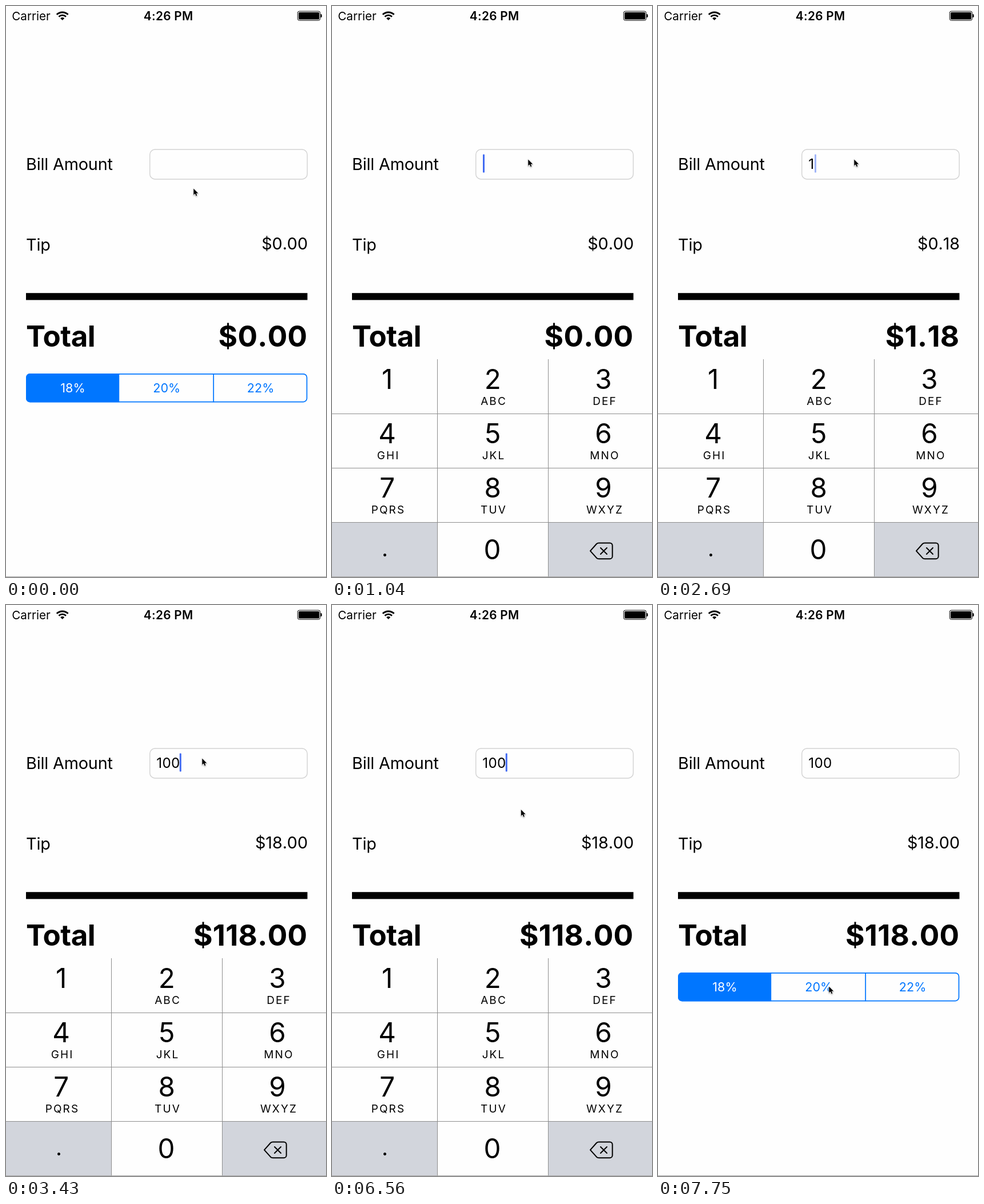
Recreate the animation shown at these times as an HTML page with a canvas. Size 560x999 px, loop 8000 ms.

```html
<!DOCTYPE html>
<html lang="en">
<head>
<meta charset="utf-8">
<title>Tip calculator</title>
<style>
html, body { margin: 0; width: 100%; height: 100%; overflow: hidden; background: #fefefe; }
canvas { display: block; width: 560px; height: 999px; }
</style>
</head>
<body>
<canvas id="stage" width="560" height="999"></canvas>
<script>
const ctx = document.getElementById('stage').getContext('2d');
const LOOP = 8000, TICK = 149;
const PAPER = '#fefefe', INK = '#000', BLUE = '#0076ff', LINE = '#8e8e8e';
const KEYPAD_HEIGHT = 381, KEYPAD_TOP = 618, ROW = 95;

// pointer path: tick, x, y
const PATH = [
  [0, 328, 319], [1, 329, 315], [2, 338, 285], [3, 343, 254], [4, 343, 268],
  [40, 343, 268], [41, 342, 277], [42, 337, 318], [43, 331, 354], [44, 330.5, 357.5],
  [48, 330.5, 357.5], [49, 326, 410], [50, 314, 530], [51, 302, 645], [52, 299, 667]
];

function text(str, x, y, size, { weight = 400, align = 'left', color = INK, gap = 0, kern = 'auto' } = {}) {
  ctx.font = `${weight} ${size}px Inter, Roboto, sans-serif`;
  ctx.letterSpacing = gap + 'px';
  ctx.fontKerning = kern;
  ctx.textAlign = align;
  ctx.fillStyle = color;
  ctx.fillText(str, x, y);
}

function rect(x, y, w, h, color) {
  ctx.fillStyle = color;
  ctx.fillRect(x, y, w, h);
}

function roundRect(x, y, w, h, r) {
  ctx.beginPath();
  ctx.roundRect(x, y, w, h, r);
}

function stroke(color, width) {
  ctx.strokeStyle = color;
  ctx.lineWidth = width;
  ctx.stroke();
}

// share of the way left for a critically damped spring
function springLeft(ms) {
  if (ms <= 0) return 1;
  const p = ms * 0.02;
  return (1 + p) * Math.exp(-p);
}

function keypadOffset(ms) {
  const left = ms < 6800 ? springLeft(ms - 595) : 1 - springLeft(ms - 6800);
  return Math.round(KEYPAD_HEIGHT * left);
}

function caretAlpha(tick) {
  if (tick < 5 || tick > 45) return 0;
  if (tick > 20 && tick < 26) return 1;
  const phase = (tick - (tick < 21 ? 15 : 26) + 28) % 7;
  return [0.5, 0, 0, 0.5, 1, 1, 1][phase];
}

function billAt(tick) {
  if (tick < 18) return '';
  if (tick < 21) return '1';
  return tick < 23 ? '10' : '100';
}

function pointerAt(tick) {
  const next = PATH.findIndex(p => p[0] > tick);
  if (next < 0) return PATH[PATH.length - 1].slice(1);
  const [t0, x0, y0] = PATH[next - 1], [t1, x1, y1] = PATH[next];
  const p = (tick - t0) / (t1 - t0);
  return [x0 + (x1 - x0) * p, y0 + (y1 - y0) * p];
}

function drawStatus() {
  text('Carrier', 10.3, 24.7, 20.6);
  text('4:26 PM', 284.2, 24.7, 20.8, { weight: 600, align: 'center', gap: 0.3 });

  const a = -Math.PI * 0.75, b = -Math.PI * 0.25;
  for (const [r, width] of [[14, 2.8], [8.9, 2.7]]) {
    ctx.beginPath();
    ctx.arc(98.7, 25, r, a, b);
    stroke(INK, width);
  }
  ctx.beginPath();
  ctx.moveTo(98.7, 25);
  ctx.arc(98.7, 25, 5, a, b);
  ctx.fillStyle = INK;
  ctx.fill();

  roundRect(510.3, 9.2, 39.5, 16, 3);
  stroke(INK, 1);
  roundRect(512, 10.9, 36.2, 12.7, 1.5);
  ctx.fill();
  roundRect(550.6, 14, 2.2, 6.3, [0, 2, 2, 0]);
  ctx.fill();
}

function drawForm(bill, caret) {
  const amount = Number(bill);
  const body = { gap: -0.18 };
  const money = { align: 'right', kern: 'none' };
  text('Bill Amount', 35, 287, 28.8, body);
  text('Tip', 35, 428, 28.8, body);
  text('$' + (amount * 0.18).toFixed(2), 528, 426, 28.8, { ...money, gap: -0.1 });

  roundRect(251.7, 251, 275.5, 52, 9);
  stroke('#d2d2d2', 1.4);
  text(bill, 263.2, 285, 24.3, { kern: 'none', gap: 0.3 });
  if (caret) {
    ctx.globalAlpha = caret;
    roundRect(264 + [0, 10, 25, 39.8][bill.length], 259.5, 3, 32, 1);
    ctx.fillStyle = '#426bf2';
    ctx.fill();
    ctx.globalAlpha = 1;
  }

  rect(35, 502.2, 492.5, 12.2, INK);
  text('Total', 35, 596.4, 51, { weight: 700, gap: -0.5 });
  text('$' + (amount * 1.18).toFixed(2), 527.5, 596.4, 51.3, { ...money, weight: 700, gap: 0.3 });
}

function drawSegments() {
  ctx.save();
  roundRect(35, 643, 492.4, 50.3, 7);
  ctx.clip();
  rect(35, 643, 163.2, 51, BLUE);
  rect(362.3, 643, 1.75, 51, BLUE);
  ctx.restore();
  roundRect(35.9, 643.9, 490.6, 48.6, 6);
  stroke(BLUE, 1.75);
  ['18%', '20%', '22%'].forEach((label, i) =>
    text(label, 117 + i * 164.3, 676.4, 21.6, { align: 'center', color: i ? BLUE : '#fff' }));
}

function drawDelete() {
  ctx.lineJoin = ctx.lineCap = 'round';
  ctx.beginPath();
  ctx.moveTo(452, 953.3);
  ctx.lineTo(463, 941);
  ctx.quadraticCurveTo(464.5, 939.5, 467, 939.5);
  ctx.arcTo(490.7, 939.5, 490.7, 953, 4.5);
  ctx.arcTo(490.7, 967.2, 475, 967.2, 4.5);
  ctx.lineTo(467, 967.2);
  ctx.quadraticCurveTo(464.5, 967.2, 463, 965.7);
  ctx.closePath();
  ctx.moveTo(470, 948);
  ctx.lineTo(481, 959);
  ctx.moveTo(481, 948);
  ctx.lineTo(470, 959);
  stroke(INK, 2);
}

function drawKeypad(offset) {
  if (offset >= KEYPAD_HEIGHT) return;
  ctx.save();
  ctx.translate(0, offset);
  rect(0, KEYPAD_TOP, 560, KEYPAD_HEIGHT, PAPER);
  rect(0, 903, 184, 96, '#d2d5dc');
  rect(379, 903, 181, 96, '#d2d5dc');
  for (const x of [184, 378]) rect(x, KEYPAD_TOP, 1, KEYPAD_HEIGHT, LINE);
  for (let i = 1; i < 4; i++) rect(0, KEYPAD_TOP + i * ROW, 560, 1, LINE);

  const mid = { align: 'center' };
  const letters = ['', 'ABC', 'DEF', 'GHI', 'JKL', 'MNO', 'PQRS', 'TUV', 'WXYZ'];
  letters.forEach((word, i) => {
    const col = i % 3, y = Math.floor(i / 3) * ROW;
    text(String(i + 1), [96.6, 281.3, 475][col], 670 + y, 47.5, mid);
    text(word, [98.5, 283, 477.5][col], 697.5 + y, 19, { ...mid, gap: 2.1 });
  });
  text('.', 92.5, 963, 38, mid);
  text('0', 280.5, 968, 47.5, mid);
  drawDelete();
  ctx.restore();
}

function drawPointer([x, y]) {
  ctx.save();
  ctx.translate(x + 0.3, y + 0.4);
  ctx.scale(0.93, 0.93);
  ctx.beginPath();
  ctx.moveTo(0, 0);
  for (const [px, py] of [[0, 12], [2.8, 9.6], [4.6, 13.8], [6.6, 13], [4.8, 8.9], [8.5, 8.6]]) ctx.lineTo(px, py);
  ctx.closePath();
  ctx.lineJoin = 'round';
  ctx.shadowColor = 'rgba(0,0,0,.35)';
  ctx.shadowBlur = 2;
  ctx.shadowOffsetY = 1;
  stroke('#fff', 1.6);
  ctx.shadowColor = 'transparent';
  ctx.fillStyle = INK;
  ctx.fill();
  ctx.restore();
}

function draw(ms) {
  // the screen refreshes in fixed ticks
  const tick = Math.floor((ms + 7) / TICK);
  rect(0, 0, 560, 999, PAPER);
  drawStatus();
  drawForm(billAt(tick), caretAlpha(tick));
  drawSegments();
  drawKeypad(keypadOffset(tick * TICK));
  rect(0, 998, 560, 1, '#a6a6a6');
  drawPointer(pointerAt(tick));
}

const start = performance.now();
function loop() {
  draw((performance.now() - start) % LOOP);
  requestAnimationFrame(loop);
}
loop();
</script>
</body>
</html>
```
